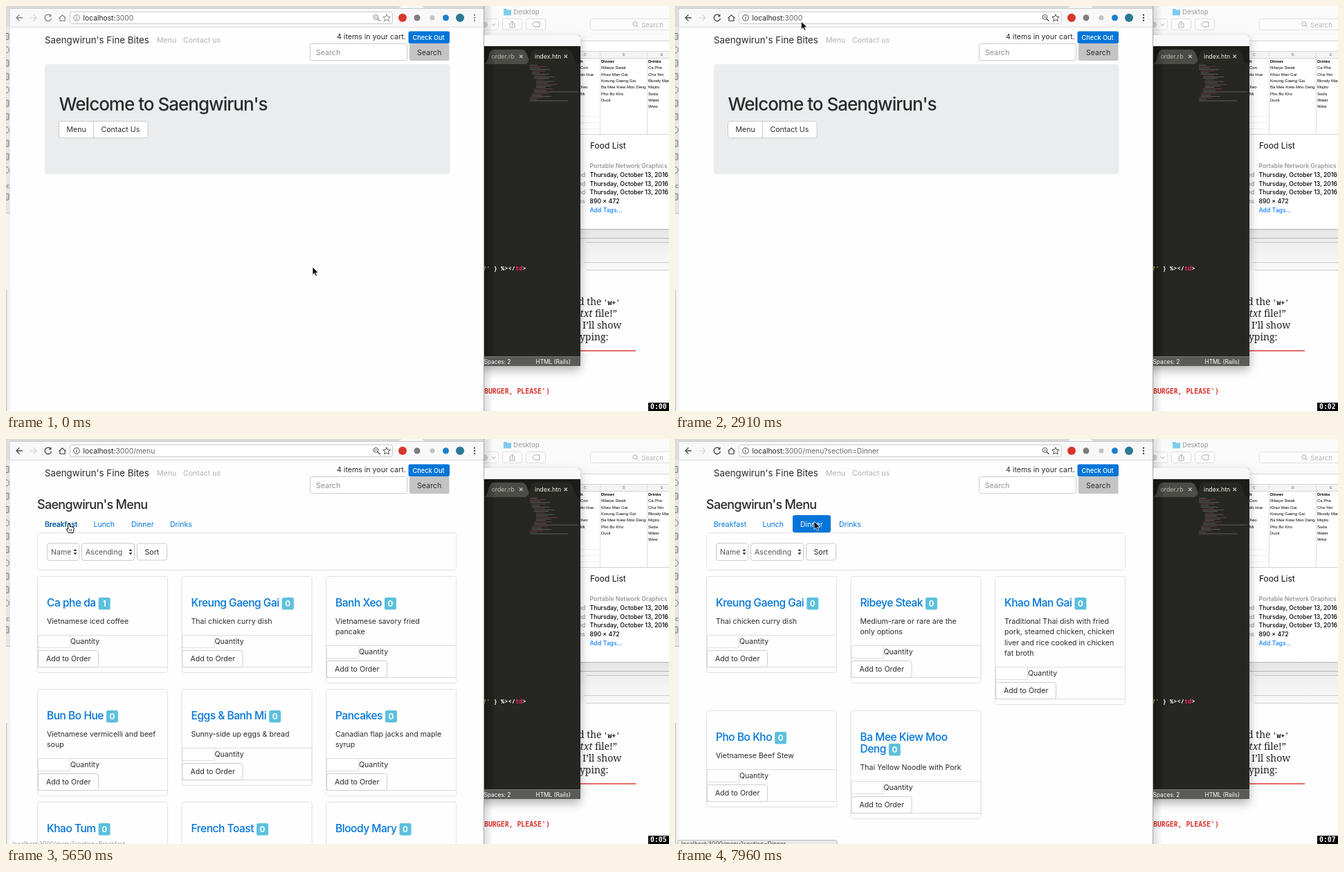
An HTML page that plays this animation: 958 by 585 pixels, repeating every 8000 ms.

```html
<!DOCTYPE html>
<html lang="en">
<head>
<meta charset="utf-8">
<title>Food ordering site</title>
<style>
html, body { margin: 0; width: 100%; height: 100%; overflow: hidden; background: #fdfdfd; }
svg { display: block; width: 958px; height: 585px; font-family: Inter, sans-serif; }
svg svg { width: auto; height: auto; }
text { white-space: pre; }
.mono { font-family: "Noto Sans Mono", monospace; }
.clock { font-family: "DejaVu Sans Mono", monospace; }
.serif { font-family: "Noto Serif", serif; }
.sheet { font-family: "Liberation Sans", sans-serif; }
#cursor { animation: cursor 8s infinite; }
</style>
</head>
<body>
<svg id="stage" viewBox="0 0 958 585"></svg>
<script>
const LOOP = 8000, BLUE = '#0275d8', INK = '#292b2c', BASE = 10.6;
const BRAND = "Saengwirun's";
const measure = document.createElement('canvas').getContext('2d');
let css = '', shown = 0;

const pct = t => `${t / LOOP * 100}%`;
const esc = s => s.replace(/&/g, '&amp;').replace(/</g, '&lt;');
const text = (x, y, s, size = BASE, fill = INK, attrs = '') =>
  `<text x="${x}" y="${y}" font-size="${size}" fill="${fill}" ${attrs}>${esc(s)}</text>`;
const rect = (x, y, w, h, fill = 'none', stroke = 'none', r = 0) =>
  `<rect x="${x}" y="${y}" width="${w}" height="${h}" rx="${r}" fill="${fill}" stroke="${stroke}"/>`;
const path = (d, stroke, width = 1, fill = 'none') =>
  `<path d="${d}" stroke="${stroke}" stroke-width="${width}" fill="${fill}"/>`;
const dot = (x, y, r, fill) => `<circle cx="${x}" cy="${y}" r="${r}" fill="${fill}"/>`;
const ring = (x, y, r, stroke) => `<circle cx="${x}" cy="${y}" r="${r}" fill="none" stroke="${stroke}"/>`;

// Wraps markup in a group that is visible only during the given [from, to] spans.
function show(markup, ...spans) {
  const name = 's' + shown++;
  const frames = spans.map(([a, b]) => `${pct(a)}{opacity:1}${pct(b)}{opacity:0}`).join('');
  css += `@keyframes ${name}{0%{opacity:0}${frames}}`;
  return `<g style="animation:${name} 8s step-end infinite">${markup}</g>`;
}

// ---- windows behind the browser ----
function sidebar() {
  let out = rect(0, 0, 6, 300, '#e6e6e6') + rect(0, 300, 6, 285, '#f4f4f4') + rect(0, 0, 6, 30, '#dcdcdc');
  for (let i = 0; i < 13; i++) {
    const y = 44 + i * 19.3;
    if (i === 11) continue;
    out += i % 3 === 1 ? ring(0, y, 4.5, '#777') : rect(-6, y - 4.5, 10, 9, '#cfcfcf', '#777', 1);
  }
  return out + text(-2, 263, 'ic', 9, '#666') + path('M0 299.5H6', '#bbb') + path('M0 410V585', '#ccc', 3);
}

function finder() {
  return rect(690, 0, 268, 50, '#fafafa') +
    path('M719 4h4l1 1.500h6v8h-11z', 'none', 0, '#7fcbee') + text(733, 12, 'Desktop', 9.6, '#999') +
    ring(692, 27, 3.5, '#aaa') + ring(692, 27, 1.5, '#aaa') + path('M702 25.500l2.500 3l2.500-3', '#aaa') +
    rect(680.5, 18.500, 31, 16, 'none', '#e3e3e3', 3) +
    rect(717.500, 18.500, 28, 16, '#fcfcfc', '#ddd', 3) + rect(751.500, 18.500, 28, 16, '#fcfcfc', '#ddd', 3) +
    path('M729.500 25H728v6h7v-6h-1.500M731.500 29v-7m-2 2l2-2l2 2', '#aaa') +
    path('M760 26.500l4-3.500h7v7h-7z', '#aaa') +
    rect(844.500, 18.500, 120, 16, '#fcfcfc', '#e2e2e2', 3) +
    ring(909, 26, 3, '#aaa') + path('M911 28l3 3', '#aaa') + text(918, 30.500, 'Search', 9.6, '#b5b5b5');
}

function spreadsheet() {
  const columns = [
    [830, 'h|Con|do Hue||Xeo|Mi'],
    [860, 'Dinner|Ribeye Steak|Khao Man Gai|Kreung Gaeng Gai|Ba Mee Kiew Moo Deng|Pho Bo Kho|Duck'],
    [928, 'Drinks|Ca Phe|Cha Yen|Bloody Mary|Mojito|Soda|Water|Wine']];
  let out = rect(825, 50, 133, 272, '#fff') + rect(825, 65, 133, 10, '#f4f4f4') +
    path('M825 50.500H958M825 65.500H958M825 75.500H958M825 185.500H958', '#d4d4d4') +
    path('M858.500 66V185M926.500 66V185', '#ddd') + path('M830 159.500h28M830 168.500h28M830 177.500h28', '#eee') +
    ['C', 'D', 'E'].map((c, i) => text([835, 891, 946][i], 72, c, 5, '#555', 'class="sheet"')).join('');
  for (const [x, rows] of columns)
    rows.split('|').forEach((s, i) => out += text(x, 82 + i * 9.35, s, 6, '#000',
      `class="sheet" font-weight="${i ? 400 : 700}"`));
  return out;
}

function fileInfo() {
  const line = (x, y, s, fill = '#000') => text(x, y, s, 8.7, fill, 'font-weight="450"');
  return text(844, 205.500, 'Food List', 12, '#111') +
    text(843.500, 234, 'Portable Network Graphics', 8.6, '#999', 'font-weight="600"') +
    [247, 260, 272].map(y => line(843.5, y, 'Thursday, October 13, 2016') + line(827, y, 'ed', '#999')).join('') +
    line(827, 285, 'ns', '#999') + line(843.5, 285, '890 × 472') + line(843.5, 297.5, 'Add Tags...', '#1a82fb');
}

function documentPage() {
  return rect(690, 322, 268, 62, 'url(#bands)') +
    path('M830 322.500H958M830 335.500H958', '#b5b5b5') + path('M838 341.500H958', '#c4c4c4') +
    path('M835 370.500H958M838 381.500H958', '#cfcfcf') +
    rect(690, 382, 268, 203, '#fefefe') +
    text(827, 432, 'd the', 14, '#222', 'class="serif"') +
    text(863.500, 432, "'w+'", 9.8, '#222', 'class="mono" font-weight="600"') +
    text(826, 449, '.txt', 14, '#222', 'class="serif" font-style="italic"') +
    text(851, 449, 'file!”', 14, '#222', 'class="serif"') +
    text(833, 466, 'I’ll show', 14, '#222', 'class="serif"') +
    text(824, 483, 'typing:', 14, '#222', 'class="serif"') +
    path('M826 498H910', '#dd3b33', 1.3) +
    text(691, 560, "BURGER, PLEASE')", 9.9, '#d8322a', 'class="mono" font-weight="700"');
}

function editor() {
  let map = '';
  for (let i = 0; i < 25; i++) {
    const indent = [0, 3, 6, 9][Math.round(1.5 - 1.5 * Math.cos(i / 4))];
    const width = i === 18 ? 64 : i === 24 ? 55 : 10 + (i * 37 % 23);
    map += rect(757 + indent, 85 + i * 2.15, width, .7, ['#77756a', '#7d4454', '#6c6a5e'][i % 3]);
  }
  return `<g filter="url(#soft)">${rect(660, 42, 170, 478, '#272822', 'none', 4)}</g>` +
    path('M660 59V46q0-4 4-4h162q4 0 4 4v13z', 'none', 0, '#f8f8f8') +
    rect(660, 58, 170, 26, '#1c1d19') +
    path('M690 84q5-1 7-11t7-10h42q5 0 8 10t7 11z', 'none', 0, '#4b4c46') +
    path('M750 84q5-1 7-11t7-10h48q6 0 8 10t8 11z', 'none', 0, '#272822') +
    text(701.500, 76, 'order.rb', 8.8, '#b9b9b4') + text(764, 76, 'index.htn', 8.8, '#f2f2ee') +
    path('M742 70.500l4.500 4.500m0-4.500l-4.500 4.500M806.500 70.500l4.500 4.500m0-4.500l-4.500 4.500', '#bbb', 1.3) + map +
    `<text class="mono" x="689" y="382" font-size="8.7" font-weight="700" fill="#f5f5ef">` +
    `<tspan fill="#e0d36c">?'</tspan> } %>&lt;/<tspan fill="#f0246c">td</tspan>&gt;</text>` +
    rect(660, 506, 170, 14, '#5a5a58') + path('M660 506.500H830', '#777') +
    text(690.500, 516.500, 'Spaces: 2', 8.3, '#fff') + text(765.500, 516.500, 'HTML (Rails)', 8.3, '#fff') +
    rect(690, 59, 16, 447, 'url(#edge)');
}

// ---- browser chrome ----
function navIcons(color) {
  return path('M24 17H15m4.500-4.500L15 17l4.500 4.500', color, 1.3) +
    path('M64.500 14a4.700 4.700 0 1 0 1 4', color, 1.4) + path('M65.500 11.500v4h-4z', 'none', 0, color) +
    path('M76.500 17.500l5-4.500l5 4.500M78 17v4.500h7V17', color, 1.2) +
    ring(102, 17, 4.3, color) + path('M102 16v3.500m0-5.300v1', color, 1.1) +
    ring(534.500, 16, 3.4, color) + path('M537 18.500l3.500 3.500M533 16h3', color, 1.2) +
    path('M550 12l1.500 3.500l3.700.3l-2.800 2.400l.9 3.700l-3.300-2l-3.300 2l.9-3.700l-2.800-2.400l3.700-.3z', color) +
    [13, 17, 21].map(y => dot(677, y, 1.2, color)).join('');
}

const address = (rest, ...spans) => show(
  `<text x="111.500" y="21" font-size="10.3" fill="#222">localhost:<tspan fill="#666">${rest}</tspan></text>`, ...spans);

function chrome() {
  return rect(6, 0, 684, 585, '#fefefe') + rect(6, 0, 684, 4, '#d9d9d9') +
    path('M562 4q6 0 9-4h30q3 4 9 4z', 'none', 0, '#f8f8f8') +
    rect(6, 3, 684, 28, '#f8f8f8') + path('M6 3.500H690', '#c9c9c9') + path('M6 30.500H690', '#dcdcdc') +
    rect(92.500, 8.500, 466, 17, '#fff', '#cbcbcb', 3) +
    show(rect(93, 8.500, 465.500, 17, '#fff', '#5b9fe8', 2) + rect(111, 11, 74, 13, '#a9cff7'), [1540, 2320]) +
    path('M35 17h9m-4.500-4.500L44 17l-4.500 4.500', '#d3d3d3', 1.2) +
    show(navIcons('#858585'), [0, 1540]) + show(navIcons('#4a4a4a'), [1540, LOOP]) +
    show(rect(55, 10, 12, 14, '#f8f8f8') + path('M57 13l8 8m0-8l-8 8', '#4a4a4a', 1.3), [2320, 2470]) +
    dot(573, 17, 6, '#d8362d') + dot(594, 17, 4.500, '#7d7d7d') + dot(616, 17, 3.500, '#c2c2c2') +
    dot(635.500, 17, 4.500, '#1b7fd0') + dot(656, 17, 6, '#2b7894') +
    address('3000', [0, 3890]) + address('3000/menu', [3890, 6140]) +
    address('3000/menu?section=Breakfast', [6140, 6900]) +
    address('3000/menu?section=Lunch', [6900, 7800]) + address('3000/menu?section=Dinner', [7800, LOOP]);
}

function status(rest, from, to) {
  const label = text(9, 588, 'localhost:3000/menu' + rest, 8.5, '#444');
  return show(rect(4, 579.500, 230, 12, '#e9e9e9', '#bbb', 2) + label, [from, to]);
}

// ---- site ----
const button = (x, y, w, label, dx) => rect(x, y, w, 24, '#fff', '#ccc', 3) + text(x + dx, y + 15.5, label);
const heading = (x, y, s, size) => text(x, y, s, size, INK, 'font-weight="500" letter-spacing="-.038em"');

function siteHeader() {
  return text(56, 54, BRAND + ' Fine Bites', 13.3) +
    text(218, 52.500, 'Menu', BASE, '#b0b0b0') + text(256, 52.500, 'Contact us', BASE, '#b0b0b0') +
    show(text(218, 52.500, 'Menu', BASE, '#858585'), [3600, 4050]) +
    text(478, 48, '4 items in your cart.') + rect(581.5, 36.500, 59.500, 17.5, BLUE, 'none', 2.500) +
    text(587.500, 48.700, 'Check Out', 9.2, '#fff', 'font-weight="500"') +
    rect(439.500, 54.500, 140, 24, '#fff', '#ccc', 2) + text(448, 70.500, 'Search', BASE, '#8d8d8d') +
    rect(583, 54, 57.500, 25, '#c4c4c4', 'none', 2) + text(594, 70.500, 'Search');
}

function home() {
  return rect(56, 84, 585.500, 159, '#ebecee', 'none', 4) +
    heading(76.500, 150.500, 'Welcome to ' + BRAND, 26) +
    button(76.500, 166.500, 128.500, 'Menu', 11) + path('M126.500 167v23', '#ccc') + text(137.500, 182, 'Contact Us');
}

const TABS = [['Breakfast', 56, 69], ['Lunch', 126.500, 52], ['Dinner', 181, 55], ['Drinks', 237, 53]];
const tabText = (i, color) => text(TABS[i][1], 126.500, TABS[i][0], 10.5, color);

function spinner(x) {
  return path(`M${x} 162l2.500-3.500l2.500 3.500zM${x} 164l2.500 3.500l2.500-3.500z`, 'none', 0, '#444');
}

function menuTop(active) {
  return heading(45, 100.500, BRAND + ' Menu', 18) +
    TABS.map(([, x, w], i) => (i === active ? rect(x - 11, 110, w, 25, BLUE, 'none', 3) : '') +
      tabText(i, i === active ? '#fff' : BLUE)).join('') +
    rect(45.500, 135.500, 605, 54, 'none', '#e2e2e2', 3) +
    rect(59.500, 150.500, 46, 25, '#fff', '#ccc', 3) + text(65, 166.500, 'Name', BASE, '#555') + spinner(97.500) +
    rect(109.500, 150.500, 76, 25, '#fff', '#ccc', 3) + text(115, 166.500, 'Ascending', BASE, '#555') + spinner(177.500) +
    button(189.500, 151, 43, 'Sort', 11);
}

function photo(x, y) {
  const sausage = (d, color, width) =>
    `<path d="${d}" fill="none" stroke="${color}" stroke-width="${width}" stroke-linecap="round"/>`;
  const oval = (cx, cy, rx, ry, fill) => `<ellipse cx="${cx}" cy="${cy}" rx="${rx}" ry="${ry}" fill="${fill}"/>`;
  return `<svg x="${x}" y="${y}" width="210" height="159">` + rect(0, 0, 210, 159, '#6f431d') +
    '<g filter="url(#blur)">' +
    oval(98, 84, 112, 80, '#d8c9ae') + oval(22, 8, 40, 16, '#9a7848') + oval(196, 10, 44, 22, '#5e3c1d') +
    oval(98, 92, 88, 56, '#8a4f1d') +
    oval(42, 34, 40, 24, '#c99a58') + oval(110, 24, 22, 14, '#d9cfa0') +
    oval(154, 36, 38, 30, '#4f5422') + oval(140, 26, 13, 11, '#8b8f4a') + oval(178, 58, 24, 18, '#303817') +
    oval(160, 90, 42, 24, '#d19a3c') + oval(176, 98, 22, 13, '#e6c277') +
    oval(66, 56, 39, 37, '#2c180c') + oval(66, 66, 20, 18, '#512e16') +
    sausage('M18 90Q34 126 82 140', '#8a4015', 27) + sausage('M24 94Q42 120 78 132', '#c06a2b', 6) +
    sausage('M96 90Q132 98 150 132', '#8f4417', 28) + sausage('M102 84Q132 92 150 120', '#c97835', 6) +
    '</g></svg>';
}

function titleEnd(line) {
  measure.font = '500 15.5px Inter, sans-serif';
  return measure.measureText(line).width - line.length * 15.5 * .03;
}

function card(x, y, top, [name, about, count = 0]) {
  const title = name.split('|'), lines = about.split('|');
  const last = y + 44 + (title.length - 1) * 17, foot = Math.round(last + 41 + (lines.length - 1) * 15.6) - .5;
  const badge = x + 14 + titleEnd(title[title.length - 1]) + 4;
  return title.map((s, i) => text(x + 14, y + 43.5 + i * 17, s, 15.5, BLUE,
      'font-weight="500" letter-spacing="-.03em"')).join('') +
    rect(badge, last - 13.5, 17, 17.500, '#5bc0de', 'none', 2.500) +
    text(badge + 8.5, last - .5, String(count), 11.6, '#fff', 'font-weight="700" text-anchor="middle"') +
    lines.map((s, i) => text(x + 14, last + 24 + i * 15.6, s)).join('') +
    rect(x + 1.5, foot, 187, 46, 'none', '#ddd') + rect(x + 1.5, foot, 46, 18, '#fff', '#ddd') +
    text(x + 48, foot + 12.5, 'Quantity') + button(x + 1.5, foot + 22, 87, 'Add to Order', 11.5) +
    rect(x + .5, top, 188, foot + 54 - top, 'none', '#e0e0e0', 3);
}

function menuPage(active, dishes, pictured = -1) {
  let out = menuTop(active), overlay = '', y = 198.5;
  for (let row = 0; row < dishes.length; row += 3) {
    let tallest = 0;
    dishes.slice(row, row + 3).forEach((dish, i) => {
      const x = 45 + i * 208.5, shift = row + i === pictured ? 144 : 0;
      out += card(x, y + shift, y, dish);
      if (shift) overlay += photo(x + .5, y + .5);
      const extra = (dish[0].split('|').length - 1) * 17 + (dish[1].split('|').length - 1) * 15.6;
      tallest = Math.max(tallest, 139 + extra + shift);
    });
    y = Math.round(y + tallest + 8.4) - .5;
  }
  return out + overlay;
}

const bunBoHue = ['Bun Bo Hue', 'Vietnamese vermicelli and beef|soup'];
const kreung = ['Kreung Gaeng Gai', 'Thai chicken curry dish'];
const eggs = ['Eggs & Banh Mi', 'Sunny-side up eggs & bread'];
const pancakes = ['Pancakes', 'Canadian flap jacks and maple|syrup'];
const khaoTum = ['Khao Tum', 'Thai rice soup'];
const toast = ['French Toast', 'Egg-dipped bread with maple|syrup'];
const ALL = [['Ca phe da', 'Vietnamese iced coffee', 1], kreung, ['Banh Xeo', 'Vietnamese savory fried|pancake'],
  bunBoHue, eggs, pancakes, khaoTum, toast, ['Bloody Mary', 'Vodka and tomato juice']];
const BREAKFAST = [eggs, pancakes, khaoTum, toast];
const LUNCH = [bunBoHue, ['Bun Con', 'Rice noodle dish'], ['Banh Mi Thit', 'Vietnamese Sandwich with|meat'],
  ['Pho', 'Vietnamese noodle'], ['Duck', 'some of dat roast duck. Quack']];
const DINNER = [kreung, ['Ribeye Steak', 'Medium-rare or rare are the|only options'],
  ['Khao Man Gai', 'Traditional Thai dish with fried|pork, steamed chicken, chicken|liver and rice cooked in chicken|fat broth'],
  ['Pho Bo Kho', 'Vietnamese Beef Stew'], ['Ba Mee Kiew Moo|Deng', 'Thai Yellow Noodle with Pork']];

function site() {
  const hover = (i, from, to) => show(tabText(i, '#014c8c'), [from, to]);
  return siteHeader() + show(home(), [0, 4050]) +
    show(menuPage(-1, ALL), [4050, 6000]) + show(menuPage(-1, ALL, 4), [6000, 6300]) +
    show(menuPage(0, BREAKFAST), [6300, 7050]) + show(menuPage(1, LUNCH), [7050, 7950]) +
    show(menuPage(2, DINNER), [7950, LOOP]) +
    hover(0, 5500, 6300) + hover(1, 6690, 7050) + hover(2, 7650, 7950) +
    status('', 3600, 4150) +
    show(text(9, 588, 'localhost:3000/menu?section=Breakfast', 8.5, '#999'), [5500, 5820]) +
    status('?section=Breakfast', 5820, 6450) + status('?section=Lunch', 6690, 7360) +
    status('?section=Dinner', 7650, LOOP);
}

// ---- pointer and clock ----
function pointer() {
  const moves = [[150, 1230, 182, 60, 7], [1230, 1690, 174, 18, 3], [2770, 3820, 233, 48, 7],
    [4630, 5650, 91, 122, 7], [6400, 6840, 148, 119, 4], [7360, 7810, 201, 119, 3]];
  const key = (t, [x, y], timing) =>
    `${pct(t)}{transform:translate(${x}px,${y}px);animation-timing-function:${timing}}`;
  let at = [443, 377], frames = key(0, at, 'step-end');
  for (const [from, to, x, y, steps] of moves) {
    frames += key(from, at, `steps(${steps},start)`);
    at = [x, y];
    frames += key(to, at, 'step-end');
  }
  css += `@keyframes cursor{${frames}${key(LOOP, at, 'step-end')}}`;
  const arrow = path('M0 0V11.500l2.700-2.500l1.900 4.300l1.900-.9l-1.900-4.100h3.700z', '#fff', .8, '#000');
  const hand = path('M-1.500 1q1.500-2 2.500 0l.6 4q1-1 2 .2q1-.8 1.800.3q1.300-.6 1.600 1v3l-1 4H-.5L-4 8.500q.5-2 2.700 0z', '#000', 1, '#fff') +
    path('M1.500 8v3.500m2-3.500v3.500', '#000', .7);
  return '<g id="cursor">' +
    show(ring(1, 0, 7.5, '#333'), [6140, 6300]) +
    show(arrow, [0, 3600], [4050, 5500], [6140, 6690], [6900, 7650], [7950, LOOP]) +
    show(hand, [3600, 4050], [5500, 6140], [6690, 6900], [7650, 7950]) + '</g>';
}

function clock() {
  let out = rect(928, 573, 30, 12, '#000');
  for (let s = 0; s < 8; s++)
    out += show(text(931, 582, '0:0' + s, 9.8, '#fff', 'class="clock" font-weight="700"'),
      [s * 1030, Math.min((s + 1) * 1030, LOOP)]);
  return out;
}

const defs = `<defs>
  <linearGradient id="bands" x2="0" y2="1"><stop stop-color="#e4e4e4"/><stop offset=".4" stop-color="#f0f0f0"/><stop offset="1" stop-color="#fafafa"/></linearGradient>
  <linearGradient id="edge"><stop stop-opacity=".35"/><stop offset="1" stop-opacity=".08"/></linearGradient>
  <linearGradient id="shade"><stop stop-opacity=".14"/><stop offset="1" stop-opacity="0"/></linearGradient>
  <filter id="soft" x="-30%" width="160%"><feDropShadow dx="0" dy="6" stdDeviation="7" flood-opacity=".3"/></filter>
  <filter id="blur"><feGaussianBlur stdDeviation="1.2"/></filter>
</defs>`;

const scene = defs + rect(0, 0, 958, 585, '#fdfdfd') + sidebar() + documentPage() + finder() +
  spreadsheet() + fileInfo() + rect(690, 0, 14, 585, 'url(#shade)') + editor() +
  path('M690.500 0V585', '#aaa') + chrome() + site() + pointer() + clock();
const style = document.createElement('style');
style.textContent = css;
document.head.append(style);
document.getElementById('stage').innerHTML = scene;
</script>
</body>
</html>
```
